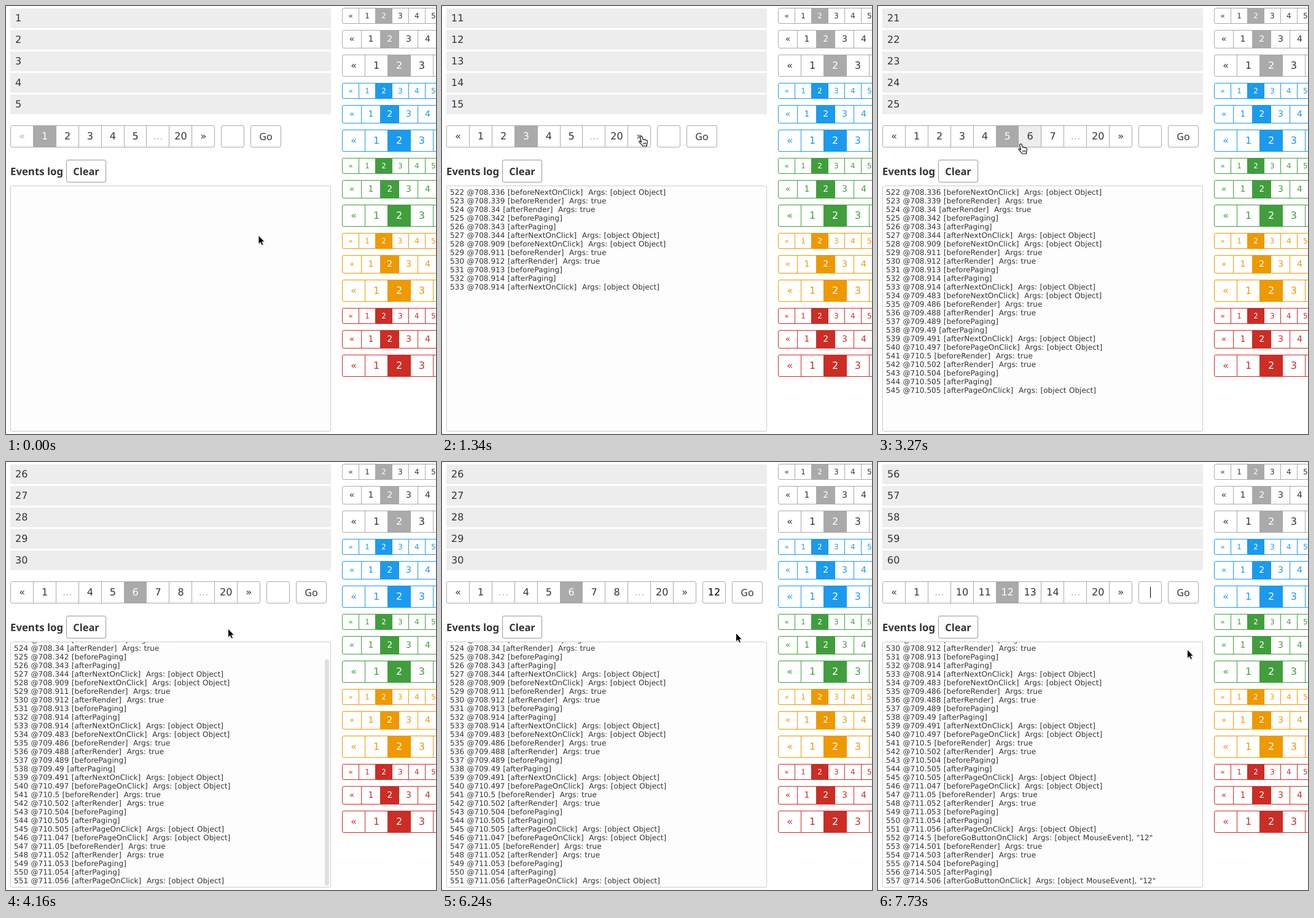
Animation, 700 px wide and 696 px high, one loop 8000 ms. Source, as an HTML page:

```html
<!DOCTYPE html>
<html lang="en">
<head>
<meta charset="utf-8">
<title>Pagination demo</title>
<style>
html, body { margin: 0; width: 100%; height: 100%; overflow: hidden; background: #fff; }
body { position: relative; color: #333; font: 16px "DejaVu Sans", sans-serif; text-rendering: geometricPrecision; cursor: default; }
body * { box-sizing: border-box; }
.row, .pager, .cell, .box, #log, #text, #thumb, #caret, #title, #cursor { position: absolute; white-space: pre; }
.row { left: 7px; width: 522px; height: 32px; padding-left: 8px; line-height: 32px; background: #ededed; }
.pager { border: 1px solid var(--c); border-radius: 3px; overflow: hidden; background: #fff; color: var(--ink); }
.cell { top: -1px; bottom: -1px; text-align: center; border-left: 1px solid var(--c); }
.cell:first-child { border-left-color: transparent; }
.cell.off { color: #b4b4b4; }
.cell.hover { background: #ededed; }
.cell.on { background: var(--c); color: #fff; }
.box { top: 194px; height: 36px; border: 1px solid #aaa; border-radius: 3px; background: #fff; text-align: center; line-height: 34px; }
.label { font-family: "Noto Sans", "Open Sans", sans-serif; font-weight: 500; }
#input { width: 38px; color: #000; }
#go { width: 50px; }
#clear { left: 98px; top: 250px; width: 65px; height: 37px; font-weight: 600; font-size: 16.4px; line-height: 35px; border-color: #999; }
#title { left: 7px; top: 250px; line-height: 37px; font-weight: 700; font-size: 16.8px; }
#log { left: 7px; top: 292px; width: 522px; height: 400px; border: 1px solid #ccc; border-radius: 3px; overflow: hidden; background: #fdfdfd; }
#text { left: 5px; top: 3px; font-size: 12px; line-height: 14px; letter-spacing: .06px; word-spacing: .45px; }
#thumb { right: 2px; bottom: 2px; width: 7px; border-radius: 4px; background: #000; }
#caret { top: 203px; width: 1px; height: 18px; background: #000; }
#cursor { left: 0; top: 0; width: 24px; height: 24px; overflow: visible; }
</style>
</head>
<body>
<div id="rows"></div>
<div id="pager" class="pager" style="--c:#aaa;--ink:#333"></div>
<div id="input" class="box"></div>
<div id="go" class="box label">Go</div>
<div id="title" class="label">Events log</div>
<div id="clear" class="box label">Clear</div>
<div id="log"><div id="text"></div><div id="thumb"></div></div>
<div id="caret"></div>
<div id="themes"></div>
<svg id="cursor">
  <g id="arrow">
    <path d="M.5 0V14.2L3.7 11.3 5.8 16 8.4 14.9 6.3 10.4H10.5Z" transform="translate(.6 1)" fill="#000" opacity=".25"/>
    <path d="M.5 0V14.2L3.7 11.3 5.8 16 8.4 14.9 6.3 10.4H10.5Z" fill="#000" stroke="#fff" stroke-width=".9"/>
  </g>
  <g id="hand" transform="translate(-5 0)" fill="#fff" stroke="#000" stroke-width="1.1" stroke-linejoin="round">
    <path d="M3.2 1.2C4.4 .2 5.6 .8 6 2L7.4 6.4C8.4 5.6 9.6 5.8 10 6.8 11 6 12 6.4 12.4 7.4 13.4 7 14.2 7.6 14.3 8.6 14.6 11 14.4 12.6 13.4 14.2V16.8H6.6C6 15 3.6 13 1.2 10.4 .2 9 1.6 8 3 9L4.6 10.4 2.6 3C2.4 2 2.6 1.6 3.2 1.2Z"/>
    <path d="M7.8 11.2V14M9.8 11V14M11.8 11V14" stroke-width=".9"/>
  </g>
  <path id="beam" d="M-3-8Q0-8 0-6 0-8 3-8M0-6V6M-3 8Q0 8 0 6 0 8 3 8M-1.5 1H1.5" fill="none" stroke="#222"/>
</svg>
<script>
const LOOP = 8000, TICK = 148.6, CELL = 36.9, LEFT = 7;
const $ = id => document.getElementById(id);

// tick, page shown, handler, log times
const clicks = [
  [6, 2, 'Next', '708.336 708.339 708.34 708.342 708.343 708.344'],
  [9, 3, 'Next', '708.909 708.911 708.912 708.913 708.914 708.914'],
  [13, 4, 'Next', '709.483 709.486 709.488 709.489 709.49 709.491'],
  [20, 5, 'Page', '710.497 710.5 710.502 710.504 710.505 710.505'],
  [24, 6, 'Page', '711.047 711.05 711.052 711.053 711.054 711.056'],
  [47, 12, 'GoButton', '714.5 714.501 714.503 714.504 714.505 714.506']
];
// ticks at which the pager is redrawn before hover returns
const fresh = [9, 13, 20, 24];

// pointer stops: tick, x, y
const stops = [
  [0, 410.5, 373], [4, 325, 211], [13, 325, 211], [18, 200, 220.5], [20, 200, 220.5],
  [22, 233, 223.5], [24, 233, 223.5], [28, 361, 271], [31, 429, 219], [32, 460, 189],
  [36, 460, 189], [38, 467, 205], [42, 478, 278], [43, 478, 278], [45, 514, 219],
  [47, 514, 219], [52, 503, 305], [54, 503, 305]
];

function pointerAt(k) {
  const i = Math.max(1, stops.findIndex(s => s[0] >= k));
  const [k0, x0, y0] = stops[i - 1], [k1, x1, y1] = stops[i];
  const u = (k - k0) / (k1 - k0), e = u * u * (3 - 2 * u);
  return [x0 + (x1 - x0) * e, y0 + (y1 - y0) * e];
}

function pageItems(page) {
  const lo = page <= 5 ? 1 : page - 2, hi = Math.max(5, page + 2);
  const items = ['«'];
  if (lo > 1) items.push(1, '…');
  for (let n = lo; n <= hi; n++) items.push(n);
  return items.concat('…', 20, '»');
}

function cells(items, page, step, hover) {
  return items.map((s, i) => {
    const off = s === '…' || (s === '«' && page === 1);
    const kind = s === page ? 'on' : off ? 'off' : i === hover ? 'hover' : '';
    return `<div class="cell ${kind}" style="left:${i * step - 1}px;width:${step + .5}px">${s}</div>`;
  }).join('');
}

function logLines(group, g) {
  const [, , kind, times] = group;
  const names = [`before${kind}OnClick`, 'beforeRender', 'afterRender', 'beforePaging', 'afterPaging', `after${kind}OnClick`];
  return times.split(' ').map((time, i) => {
    const clickArgs = kind === 'GoButton' ? '[object MouseEvent], "12"' : '[object Object]';
    const args = /Click/.test(names[i]) ? clickArgs : /Render/.test(names[i]) ? 'true' : '';
    return `${522 + g * 6 + i} @${time} [${names[i]}]` + (args && `  Args: ${args}`);
  });
}

function drawThemes() {
  const colors = [['#aaa', '#333'], ['#1b9aee'], ['#419e3d'], ['#ee9900'], ['#cc2d25']];
  const sizes = [[3, 26, 26.9, 12], [39, 30, 30.8, 14], [79, 36, CELL, 16]];
  const items = ['«', 1, 2, 3, 4, 5, 6];
  $('themes').innerHTML = colors.map(([c, ink = c], n) => sizes.map(([top, h, step, font]) =>
    `<div class="pager" style="--c:${c};--ink:${ink};left:547px;top:${top + n * 122}px;width:260px;` +
    `height:${h}px;font-size:${font}px;line-height:${h}px">${cells(items, 2, step)}</div>`
  ).join('')).join('');
}

function drawPointer(x, y, end) {
  const inBar = y >= 194 && y < 230;
  const over = (a, b) => inBar && x >= a && x < b;
  const shape = over(LEFT, end) || over(end + 58, end + 108) ? 'hand'
    : over(end + 10, end + 48) ? 'beam' : 'arrow';
  for (const id of ['arrow', 'hand', 'beam']) $(id).style.display = id === shape ? '' : 'none';
  $('cursor').style.transform = `translate(${x}px,${y}px)`;
}

function drawLog(done, k) {
  const lines = done.flatMap(logLines), n = lines.length;
  $('text').textContent = lines.join('\n');
  $('text').style.transform = `translateY(${-14 * Math.max(0, n - 28)}px)`;
  const since = n > 28 ? (k - done[done.length - 1][0]) * TICK : Infinity;
  const fade = Math.min(1, Math.max(0, 1 - (since - 440) / 200));
  $('thumb').style.opacity = .5 * fade;
  $('thumb').style.height = 394 * 398 / (n * 14 + 6) + 'px';
}

function draw(k) {
  const done = clicks.filter(c => c[0] <= k);
  const page = done.length ? done[done.length - 1][1] : 1;
  const items = pageItems(page), end = LEFT + items.length * CELL + .9;
  const [x, y] = pointerAt(k);

  $('rows').innerHTML = [0, 1, 2, 3, 4].map(i =>
    `<div class="row" style="top:${4 + i * 35}px">${page * 5 - 4 + i}</div>`).join('');

  const inPager = y >= 194 && y < 230 && x < end && !fresh.includes(k);
  const hover = inPager ? Math.floor((x - LEFT) / CELL) : -1;
  $('pager').innerHTML = cells(items, page, CELL, hover);
  $('pager').style.cssText += `;left:${LEFT}px;top:194px;height:36px;line-height:36px;width:${end - LEFT}px`;

  const typed = k >= 35 && k < 47 ? '12'.slice(0, k - 34) : '';
  $('input').textContent = typed;
  $('input').style.left = Math.round(end + 10) + 'px';
  $('go').style.left = Math.round(end + 58) + 'px';
  $('caret').style.left = Math.round(end + 29 + typed.length * 5.1) + 'px';
  $('caret').style.display = (k >= 31 && k < 38) || k >= 47 ? '' : 'none';

  drawLog(done, k);
  drawPointer(x, y, end);
}

let shown = -1;
function frame() {
  const k = Math.min(53, Math.floor((performance.now() % LOOP + 8) / TICK));
  if (k !== shown) draw(shown = k);
  requestAnimationFrame(frame);
}
drawThemes();
frame();
</script>
</body>
</html>
```
